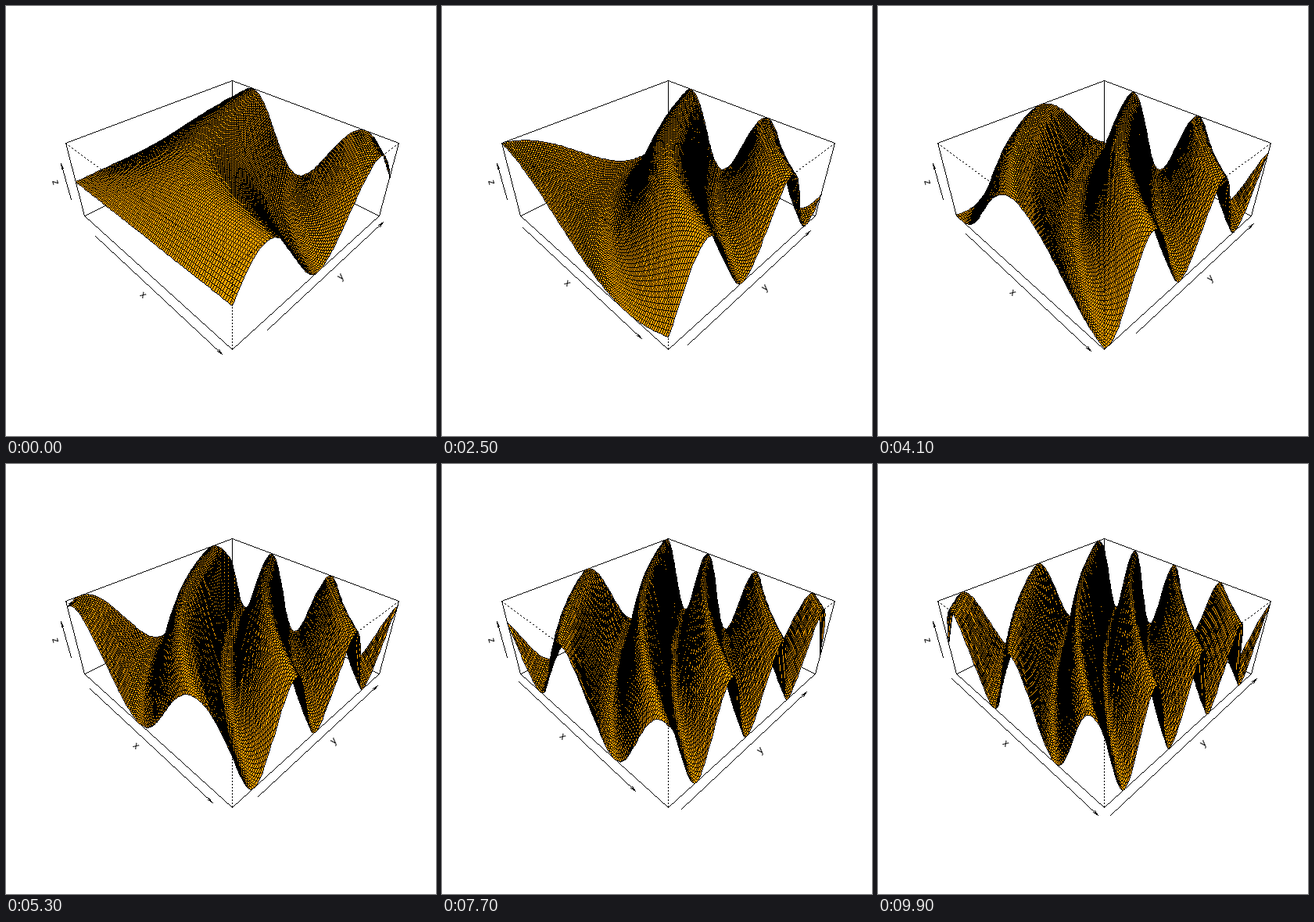
Recreate the animation shown at these times as a matplotlib script. Size 550x550 px, loop 10000 ms.

```python
from itertools import combinations, product

import numpy as np
import matplotlib.pyplot as plt
from matplotlib.animation import FuncAnimation
from matplotlib.colors import ListedColormap

SIZE, FRAMES = 550, 100
BLACK, ORANGE, WHITE = 0, 1, 2
SPAN, STEP, N = 3.0, 0.05, 100

# Camera: 45 degree turn, 35 degree tilt, flattened box
PHI = np.radians(35)
FLAT, DIST = 0.4, np.sqrt(3) + 2
CX, CY, SCALE = 289.4, 225.02, 528.27
TICK_GAP, LABEL_GAP = 0.06, 0.14


def project(x, y, z):
    """Box coordinates in [-1, 1] to pixels."""
    side, near, up = (x + y) / np.sqrt(2), (x - y) / np.sqrt(2), z * FLAT
    w = DIST - near * np.cos(PHI) - up * np.sin(PHI)
    height = up * np.cos(PHI) - near * np.sin(PHI)
    return CX + SCALE * side / w, CY - SCALE * height / w


def snap(v):
    """Nearest whole pixel, halves going up or left."""
    return (v + 0.4999).astype(np.int32)


def stroke(img, p, q, dotted=False):
    """One pixel wide line without smoothing."""
    (x0, y0), (x1, y1) = np.floor(p), np.floor(q)
    n = int(max(abs(x1 - x0), abs(y1 - y0), 1))
    k = np.arange(n + 1)
    if dotted:
        k = k[k % 4 < 2]
    img[snap(y0 + (y1 - y0) * k / n), snap(x0 + (x1 - x0) * k / n)] = BLACK


def arrow(img, p, q, length=7.2, spread=np.radians(10)):
    stroke(img, p, q)
    back = np.arctan2(p[1] - q[1], p[0] - q[0])
    for a in (back - spread, back + spread):
        stroke(img, q, (q[0] + length * np.cos(a), q[1] + length * np.sin(a)))


# Box edges: the three meeting at the near top corner are dotted
CORNERS = product((-1, 1), (-1, 1), (1, -1))
EDGES = [(a, b) for a, b in combinations(CORNERS, 2)
         if sum(u != v for u, v in zip(a, b)) == 1]
NEAR_TOP = (1, -1, 1)


def box(img, front):
    for a, b in EDGES:
        if (NEAR_TOP in (a, b)) == front:
            stroke(img, project(*a), project(*b), dotted=front)


# Facets from far to near, with their four corners in the flat grid
fi, fj = (g.ravel() for g in np.mgrid[:N - 1, :N - 1])
order = np.argsort(fi - fj, kind="stable")
QUADS = (fi * N + fj)[order][:, None] + np.array([0, N, N + 1, 1])

axis = np.linspace(-1, 1, N)
GX, GY = np.meshgrid(axis, axis, indexing="ij")


def fill_pixels(x, y, dx, dy):
    """Pixels inside each facet, row by row, and which of them count."""
    top = y.min(1, keepdims=True)
    rows = top + np.arange(int((y.max(1) - top[:, 0]).max()) + 1,
                           dtype=np.float32)
    left = np.full(rows.shape, np.inf, np.float32)
    right = -left
    for x0, y0, ex, ey in zip(x.T, y.T, dx.T, dy.T):
        x0, y0, ex, ey = (c[:, None] for c in (x0, y0, ex, ey))
        hit = (rows >= y0) != (rows >= y0 + ey)
        cross = x0 + ex * (rows - y0) / np.where(ey == 0, 1, ey)
        left = np.where(hit, np.minimum(left, cross), left)
        right = np.where(hit, np.maximum(right, cross), right)
    empty = right < left
    left[empty] = right[empty] = 0
    first = np.ceil(left)
    width = max(int((right - first).max()) + 1, 1)
    cols = first[..., None] + np.arange(width, dtype=np.float32)
    spots = rows[..., None].astype(np.int32) * SIZE + cols.astype(np.int32)
    keep = cols < right[..., None]
    return spots.reshape(len(x), -1), keep.reshape(len(x), -1)


def rim_pixels(x, y, dx, dy):
    """Pixels along the four sides of each facet."""
    n = np.maximum(np.maximum(abs(dx), abs(dy)), 1)[..., None]
    steps = np.arange(int(n.max()) + 1, dtype=np.float32)
    k = np.minimum(steps, n)
    cols = snap(x[..., None] + dx[..., None] * k / n)
    rows = snap(y[..., None] + dy[..., None] * k / n)
    keep = steps <= n
    return ((rows * SIZE + cols).reshape(len(x), -1),
            keep.reshape(len(x), -1))


def surface(img, start):
    s = np.linspace(start, start + SPAN, N)
    z = np.sin(np.outer(s, s))
    z = 2 * (z - z.min()) / (z.max() - z.min()) - 1
    x, y = (np.floor(c).astype(np.float32).ravel()[QUADS]
            for c in project(GX, GY, z))
    sides = x, y, np.roll(x, -1, 1) - x, np.roll(y, -1, 1) - y
    inside, keep_in = fill_pixels(*sides)
    rim, keep_rim = rim_pixels(*sides)

    keep = np.concatenate([keep_in, keep_rim], axis=1)
    spots = np.concatenate([inside, rim], axis=1)[keep]
    ink = np.repeat(np.array([ORANGE, BLACK], np.uint8),
                    [inside.shape[1], rim.shape[1]])
    # Later writes win, so near facets cover far ones
    img.reshape(-1)[spots] = np.broadcast_to(ink, keep.shape)[keep]


def axis_lines(start):
    """For each axis a point function and the arrow's two ends."""
    lo = np.ceil(start * 2 - 1e-6) / 2
    hi = np.floor((start + SPAN) * 2 + 1e-6) / 2
    a, b = (2 * (t - start) / SPAN - 1 for t in (lo, hi))
    return [
        (lambda t, g: project(t, -1 - g, -1 - g), a, b),
        (lambda t, g: project(1 + g, t, -1 - g), a, b),
        (lambda t, g: project(-1 - g, -1 - g, t), -0.5, 0.5),
    ]


fig = plt.figure(figsize=(5.5, 5.5), dpi=100, facecolor="white")
ax = fig.add_axes([0, 0, 1, 1])
ax.axis("off")
view = ax.imshow(np.full((SIZE, SIZE), WHITE, np.uint8), vmin=0, vmax=2,
                 cmap=ListedColormap(["black", "orange", "white"]),
                 interpolation="nearest", aspect="auto")
labels = [ax.text(0, 0, name, family="Liberation Sans", fontsize=8.64,
                  ha="center", va="center", rotation_mode="anchor")
          for name in "xyz"]


def update(i):
    start = STEP * (i + 1)
    img = np.full((SIZE, SIZE), WHITE, np.uint8)
    box(img, front=False)
    for label, (at, a, b) in zip(labels, axis_lines(start)):
        p, q = at(a, TICK_GAP), at(b, TICK_GAP)
        arrow(img, p, q)
        label.set_position(np.subtract(at((a + b) / 2, LABEL_GAP), 0.5))
        slope = (p[1] - q[1]) / (q[0] - p[0])
        label.set_rotation(np.degrees(np.arctan(slope)))
    surface(img, start)
    box(img, front=True)
    view.set_data(img)
    return [view, *labels]


anim = FuncAnimation(fig, update, frames=FRAMES, interval=100,
                     repeat=True, repeat_delay=0, blit=False)
plt.show()
```
